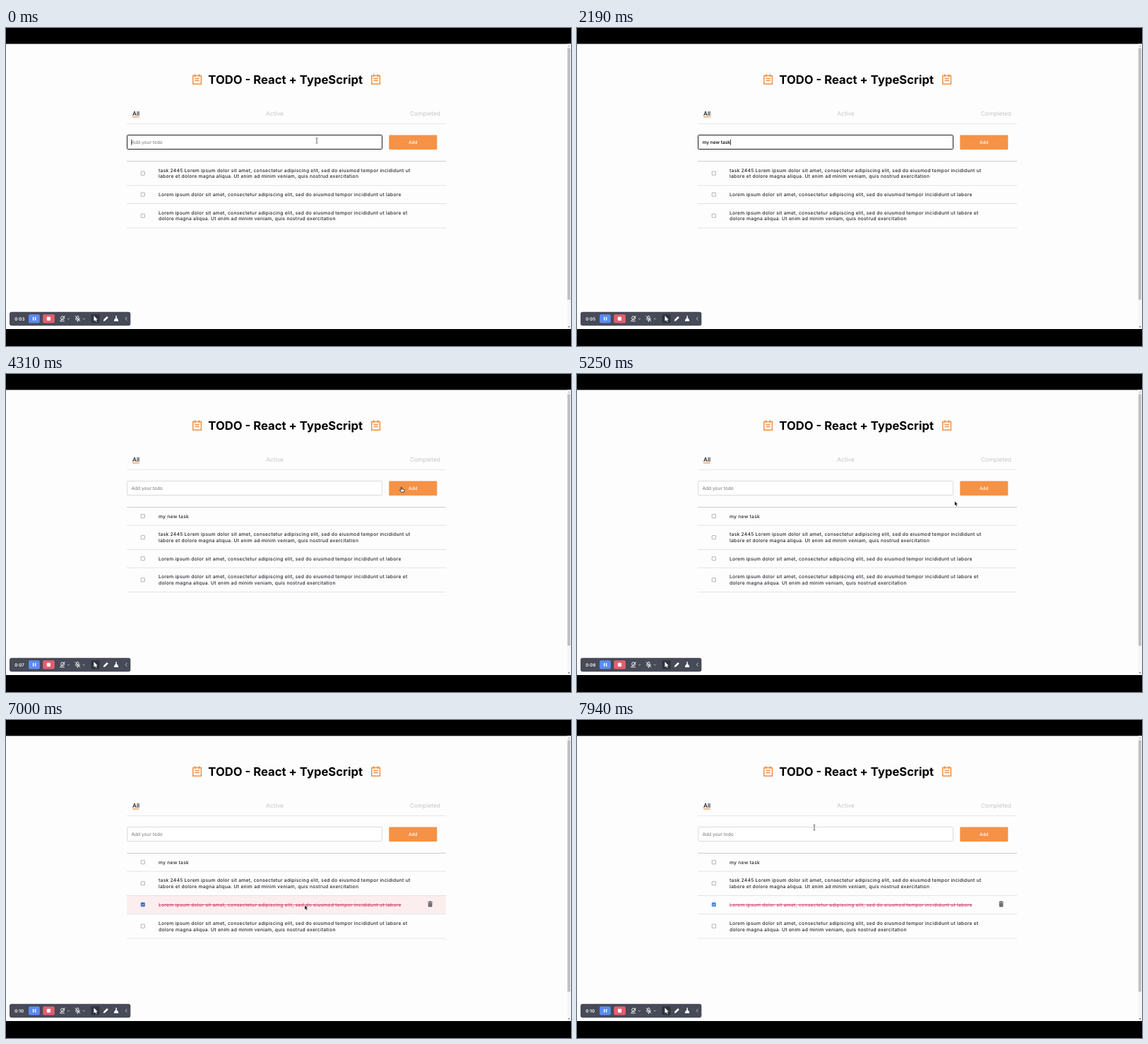
Animation of 800 by 450 pixels, one loop 8000 ms. Source, as an HTML page:

```html
<!DOCTYPE html>
<html lang="en">
<head>
<meta charset="utf-8">
<title>Todo list</title>
<style>
  html, body { margin: 0; width: 100%; height: 100%; overflow: hidden; background: #000; }
  svg { display: block; width: 800px; height: 450px; }
  text {
    font-family: Inter, "Open Sans", sans-serif;
    text-rendering: geometricPrecision;
    white-space: pre;
  }
  .title { font-size: 16.67px; font-weight: 700; }
  .tab { font-size: 8.33px; fill: #c6c4c8; }
  .tab.on { fill: #111; font-weight: 500; }
  .field { font-size: 6.6px; }
  .row text { font-size: 6.7px; font-weight: 500; letter-spacing: .27px; fill: #222226; }
  .row .bg { fill: none; }
  .row.hover .bg { fill: #fceeef; }
  .line { fill: #dcdce0; }
  .row:first-child .line { fill: #c0c0c5; }
  .box { fill: #fff; stroke: #808084; stroke-width: .6; }
  .done-only { display: none; }
  .row.done .done-only { display: inline; }
  .row.done text { fill: #cf3d6d; }
  .row.done .box { fill: #3a7fe0; stroke: #3a7fe0; }
  .row.done.hover .box { fill: #2a66b8; stroke: #2a66b8; }
  .time { font-size: 6.2px; font-weight: 600; fill: #fff; }
  .icon { fill: none; stroke: #fff; stroke-width: .9; stroke-linecap: round; stroke-linejoin: round; }
</style>
</head>
<body>
<svg viewBox="0 0 800 450">
  <defs>
    <g id="pad" fill="none" stroke="#ef9145" stroke-width="1.5">
      <path d="M.8 2.3H12.4V14H.8ZM3.7 0V4M9.5 0V4M3.4 6.1H9.8M3.4 9.2H9.8"/>
    </g>
  </defs>
  <rect width="800" height="450"/>
  <rect y="22.5" width="800" height="403.5" fill="#fefdfe"/>

  <rect x="794.5" y="22.5" width="5.5" height="403.5" fill="#f6f6f7"/>
  <rect x="795" y="28.5" width="4" height="356" fill="#c1c1c3"/>
  <path d="M797.2 24.6l1.4 1.7h-2.8z" fill="#a5a5a8"/>
  <path d="M797.2 424l1.4-1.7h-2.8z" fill="#505054"/>

  <use href="#pad" x="264" y="65.3"/>
  <use href="#pad" x="517" y="65.3"/>
  <text class="title" x="286.3" y="79">TODO - React + TypeScript</text>

  <text class="tab on" x="179" y="123.7">All</text>
  <rect x="179" y="125.3" width="9.7" height="1.2" fill="#ef9145"/>
  <text class="tab" x="368.3" y="123.7">Active</text>
  <text class="tab" x="572" y="123.7">Completed</text>
  <rect x="171" y="135" width="452" height="1" fill="#e8e8eb"/>

  <rect id="input" x="171.5" y="151.5" width="361" height="20" rx="1" fill="#fff"/>
  <text id="value" class="field" x="177.5" y="164"></text>
  <rect id="caret" y="157.7" width=".8" height="8" fill="#000"/>
  <rect x="542.3" y="151.5" width="68" height="20.5" rx="1" fill="#f59246"/>
  <text x="576.3" y="164" font-size="6.4" font-weight="500" text-anchor="middle" fill="#fff">Add</text>

  <g id="list"></g>
  <rect id="end" class="line" x="171" width="452" height=".8"/>

  <g id="bar">
    <rect x="5" y="401.7" width="171.3" height="19.5" rx="3" fill="#474a57"/>
    <text id="time" class="time" x="12.3" y="413.5"></text>
    <rect x="32" y="405.2" width="15.8" height="12.2" rx="2" fill="#5a8df0"/>
    <path d="M38.6 408.9v4.8M41.6 408.9v4.8" stroke="#fff" stroke-width="1.4"/>
    <rect x="52.2" y="405.2" width="16.6" height="12.2" rx="2" fill="#e2606f"/>
    <rect x="57.8" y="408.7" width="5.2" height="5.2" rx="1" fill="#fff"/>
    <g class="icon">
      <circle cx="80" cy="410.4" r="2.5"/>
      <path d="M77.6 414.8h4.8M76.4 415l7-7.4"/>
      <path d="M87.2 411.2l1.2 1.1 1.2-1.1M109 411.2l1.2 1.1 1.2-1.1" stroke-width=".6"/>
      <rect x="100" y="407.5" width="2.8" height="4.6" rx="1.4"/>
      <path d="M98.5 411c0 4 5.8 4 5.8 0M101.4 414v1.5M98 407.7l6.8 7.2"/>
    </g>
    <rect x="120.5" y="405.3" width="12" height="12.3" rx="1.5" fill="#30323c"/>
    <path d="M124.4 407.3v7.4l1.8-1.5 1.2 2.6 1.2-.6-1.2-2.5h2.3z" fill="#fff"/>
    <path d="M137.8 414.9l.6-2.5 4.5-4.5 1.9 1.9-4.5 4.5z" fill="#fff"/>
    <path d="M155.3 407.3h1.5v3.2l1.6 1.2.9 3.2h-6.5l.9-3.2 1.6-1.2z" fill="#fff"/>
    <path d="M171 409.2l-1.7 2.1 1.7 2.1" class="icon" stroke-width=".7" opacity=".75"/>
  </g>

  <g id="cursor">
    <path id="arrow" d="M0 0v6.2l1.4-1.2 1 2.3 1.1-.5-1-2.2h1.9z" fill="#000" stroke="#fff" stroke-width=".4"/>
    <path id="beam" d="M-1.4-3.5H-.3L0-3.2.3-3.5H1.4M0-3.2V3.2M-1.4 3.5H-.3L0 3.2.3 3.5H1.4" fill="none" stroke="#333" stroke-width=".75"/>
    <path id="hand" d="M-.7.5C-.7-.4.6-.4.6.5V2.8l2.6.5q1 .3.9 1.3l-.5 2.6H-.2L-2.4 4.6c-.5-.8.4-1.3 1-.7l.7.6z" fill="#fff" stroke="#000" stroke-width=".7"/>
  </g>
</svg>
<script>
const $ = id => document.getElementById(id);
const LOOP = 8000, TICK = 62.5;
const LEFT = 171, TOP = 188.1;
const lorem = 'Lorem ipsum dolor sit amet, consectetur adipiscing elit, sed do eiusmod tempor incididunt ut';
const tail = 'dolore magna aliqua. Ut enim ad minim veniam, quis nostrud exercitation';
const tasks = [
  ['my new task'],
  ['task 2445 ' + lorem, 'labore et ' + tail],
  [lorem + ' labore'],
  [lorem + ' labore et', tail]
];

// Times below are counted in ticks.
const typed = 'my new task';
const keys = [3, 6, 10, 13, 16, 20, 23, 25, 29, 32, 35];
const BLUR = 68, ADDED = 69, CHECKED = 108;
const path = [
  [57, 480, 144], [65, 560, 160], [75, 560, 160], [80, 538, 178],
  [83, 538, 178], [92, 446, 236], [95, 446, 236], [96, 440, 243],
  [97, 440, 243], [100, 423, 262], [118, 423, 262], [127, 336, 152.2]
];

const rows = tasks.map(lines => {
  const h = lines.length > 1 ? 34.4 : 25.6, mid = h / 2;
  const g = document.createElementNS('http://www.w3.org/2000/svg', 'g');
  g.setAttribute('class', 'row');
  g.innerHTML = `
    <rect class="bg" x="${LEFT}" width="452" height="${h}"/>
    <rect class="line" x="${LEFT}" width="452" height=".8"/>
    <rect class="box" x="191.2" y="${mid - 2.3}" width="5.2" height="5.2" rx=".5"/>
    ${lines.map((s, i) => `<text x="216" y="${15.5 + i * 8.9}">${s}</text>`).join('')}
    <g class="done-only">
      <path d="M192.4 ${mid + .4}l1 1.1 2-2.4" fill="none" stroke="#fff" stroke-width=".8"/>
      <rect x="216" y="${mid + .3}" width="343.5" height=".7" fill="#cf3d6d"/>
      <path d="M597.3 ${mid - 4}h2l.5-.8h1.6l.5.8h2v1h-6.6zM597.8 ${mid - 2.5}h5.6v5q0 1-1 1h-3.6q-1 0-1-1z" fill="#66666a"/>
      <path d="M599.7 ${mid - 1.4}v3.6M601.5 ${mid - 1.4}v3.6" stroke="#a0a0a4" stroke-width=".4"/>
    </g>`;
  return { g, h };
});
// The top rule is darker, and it belongs to whichever row comes first.
const list = $('list');
rows.slice(1).forEach(({ g }) => list.append(g));

const show = (el, on) => el.setAttribute('display', on ? 'inline' : 'none');

function mouseAt(k) {
  if (k < 1) return [440, 159.5];
  if (k < path[0][0]) return null;
  const i = Math.max(1, path.findIndex(p => p[0] >= k));
  const [t0, x0, y0] = path[i - 1], [t1, x1, y1] = path[i];
  const u = (k - t0) / (t1 - t0), e = u * u * (3 - 2 * u);
  return [x0 + (x1 - x0) * e, y0 + (y1 - y0) * e];
}

function drawInput(k) {
  const focus = k < BLUR, n = k < ADDED ? keys.filter(t => t <= k).length : 0;
  const value = $('value');
  value.textContent = n ? typed.slice(0, n) : 'Add your todo';
  value.setAttribute('fill', n ? '#000' : '#757579');
  value.setAttribute('font-weight', n ? 500 : 400);
  $('input').setAttribute('stroke', focus ? '#1c1c1e' : '#dadade');
  show($('caret'), k < 42 || (k >= 52 && k < 57));
  $('caret').setAttribute('x', 177.4 + (n ? value.getComputedTextLength() : 0));
}

function drawList(k, mouse) {
  const first = rows[0].g;
  if (k < ADDED) first.remove();
  else if (!first.isConnected) list.prepend(first);

  let y = TOP;
  rows.forEach(({ g, h }, i) => {
    if (!g.isConnected) return;
    const done = i === 2 && k >= CHECKED;
    const over = mouse && mouse[1] >= y && mouse[1] < y + h;
    g.setAttribute('class', 'row' + (over ? ' hover' : '') + (done ? ' done' : ''));
    g.setAttribute('transform', `translate(0 ${y})`);
    y += h + (done ? .5 : 0);
  });
  $('end').setAttribute('y', y);
}

function drawMouse(mouse) {
  show($('cursor'), mouse);
  if (!mouse) return;
  const [x, y] = mouse, band = y > 151.5 && y < 172;
  const beam = band && x < 533, hand = band && x > 542 && x < 610;
  $('cursor').setAttribute('transform', `translate(${x} ${y})`);
  show($('beam'), beam);
  show($('hand'), hand);
  show($('arrow'), !beam && !hand);
}

function draw(now) {
  const t = now % LOOP;
  const k = Math.min(127, Math.floor((t + 3) / TICK));
  const mouse = mouseAt(k);
  drawInput(k);
  drawList(k, mouse);
  drawMouse(mouse);
  const s = 3 + Math.floor(k * TICK / 1000);
  $('time').textContent = '0:' + String(s).padStart(2, '0');
}

const start = performance.now();
function loop() {
  draw(performance.now() - start);
  requestAnimationFrame(loop);
}
loop();
</script>
</body>
</html>
```
